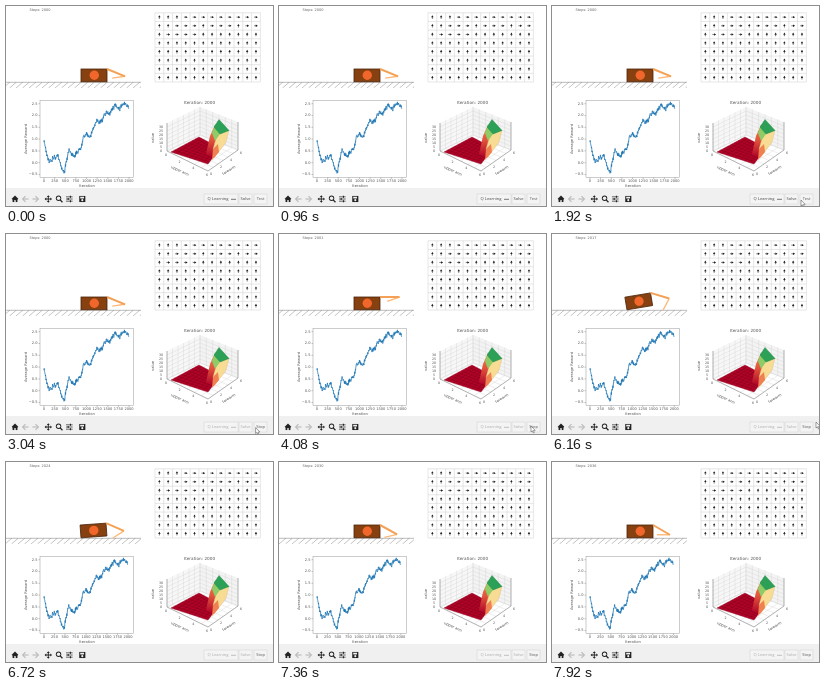
Recreate the animation shown at these times as an HTML page with a canvas. Size 267 px wide and 200 px high, loop 8 s.

```html
<!DOCTYPE html>
<html lang="en">
<head>
<meta charset="utf-8">
<title>Crawler learning</title>
<style>
html, body { margin: 0; width: 100%; height: 100%; overflow: hidden; background: #fff; }
canvas { display: block; width: 267px; height: 200px; }
</style>
</head>
<body>
<canvas id="stage"></canvas>
<script>
const canvas = document.getElementById('stage');
const c = canvas.getContext('2d');
const dpr = window.devicePixelRatio || 1;
canvas.width = 267 * dpr;
canvas.height = 200 * dpr;

const LOOP = 8000;
const RAD = Math.PI / 180;
const STEP_KEYS = [[3960, 2000], [4080, 2001], [5120, 2008], [6160, 2017], [6720, 2024], [7920, 2036]];
const REWARD = [136, 154, 150, 153, 165, 146, 147, 143, 128, 130, 119, 115, 108, 107, 100, 101, 101, 101]
  .map((y, i) => [38 + i * 5, y]);

const ramp = (v, from, to) => Math.max(0, Math.min(1, (v - from) / (to - from)));
const mix = (a, b, k) => a + (b - a) * k;
const between = (p, q, k) => [mix(p[0], q[0], k), mix(p[1], q[1], k)];

function sample(keys, at) {
  let i = 1;
  while (i < keys.length - 1 && keys[i][0] < at) i++;
  const [a, b] = [keys[i - 1], keys[i]];
  return mix(a[1], b[1], ramp(at, a[0], b[0]));
}

function path(points, stroke, width = 0.5, fill) {
  c.beginPath();
  points.forEach(([x, y]) => c.lineTo(x, y));
  if (fill) { c.closePath(); c.fillStyle = fill; c.fill(); }
  if (stroke) { c.strokeStyle = stroke; c.lineWidth = width; c.stroke(); }
}

function at(x, y, angle, scale, draw) {
  c.save();
  c.translate(x, y);
  c.rotate(angle * RAD);
  c.scale(scale, scale);
  draw();
  c.restore();
}

function text(str, x, y, size = 3.7, align = 'center', color = '#555', angle = 0, family = '"DejaVu Sans", sans-serif') {
  at(x, y, angle, 1, () => {
    c.font = `${size}px ${family}`;
    c.textAlign = align;
    c.textBaseline = 'middle';
    c.fillStyle = color;
    c.fillText(str, 0, 0);
  });
}

function disc(x, y, r, fill) {
  c.beginPath();
  c.arc(x, y, r, 0, 7);
  c.fillStyle = fill;
  c.fill();
}

// Gait: reach out with the arm raised, lower it, then pull the hand back.
function crawler(step) {
  const n = step - 2000;
  const reach = ramp(n, 1, 8), lower = ramp(n, 8, 12), pull = ramp(n, 12, 36);
  const armAngle = n ? 25 * lower + 5 * pull : 22;
  const handAngle = n ? 160 - 105 * reach + 5 * lower + 90 * Math.sqrt(pull) : 150;
  const bend = armAngle + handAngle;
  const shoulder = [26, -13];
  const elbow = [26 + 19.5 * Math.cos(armAngle * RAD), -13 + 19.5 * Math.sin(armAngle * RAD)];
  const hand = [elbow[0] + 13 * Math.cos(bend * RAD), elbow[1] + 13 * Math.sin(bend * RAD)];
  const tilt = -Math.max(0, Math.atan2(hand[1], hand[0])) / RAD;

  path([[0, 76.3], [135, 76.3]], '#777');
  c.save();
  c.beginPath();
  c.rect(0, 76, 135, 6);
  c.clip();
  for (let x = 4 - 22 * pull % 6.5; x < 145; x += 6.5) path([[x, 76], [x - 7, 82]], '#888', 0.5);
  c.restore();

  at(75, 76, tilt, 1, () => {
    c.fillStyle = '#87400f';
    c.fillRect(0, -13, 26, 12.8);
    c.strokeStyle = '#4a240c';
    c.lineWidth = 0.8;
    c.strokeRect(0, -13, 26, 12.8);
    disc(13.3, -6.7, 4.7, '#f0662b');
    path([elbow, hand], '#ffb878', 1.4);
    path([shoulder, elbow], '#f4a155', 2);
  });
}

function policyGrid() {
  const x0 = 149, y0 = 6.8, w = 8.78, h = 8.65, cols = 12, rows = 8;
  for (let i = 0; i <= cols; i++) path([[x0 + i * w, y0], [x0 + i * w, y0 + rows * h]], '#ccc', 0.5);
  for (let i = 0; i <= rows; i++) path([[x0, y0 + i * h], [x0 + cols * w, y0 + i * h]], '#ccc', 0.5);
  const pointsRight = (r, k) => r === 0 ? k > 2 : r === 1 ? k > 1 && k % 4 !== 1 : r === 2 && k > 0 && k < 5;
  for (let r = 0; r < rows; r++) for (let k = 0; k < cols; k++) {
    at(x0 + (k + 0.5) * w, y0 + (r + 0.5) * h, pointsRight(r, k) ? 0 : -90, 1, () => {
      path([[-1.8, 0], [1, 0]], '#222', 0.6);
      path([[-0.2, -1.2], [1.9, 0], [-0.2, 1.2]], null, 0, '#222');
    });
  }
}

function rewardPlot(step) {
  const toX = x => 38 + (x - 38) * 2000 / step;
  c.strokeStyle = '#999';
  c.lineWidth = 0.5;
  c.strokeRect(34, 94.3, 93.5, 77.2);
  for (let i = 0; i <= 8; i++) {
    const x = toX(38 + i * 10.63);
    path([[x, 171.5], [x, 173]], '#888');
    text(i * 250, x, 175.3, 3.6);
  }
  for (let i = 0; i < 7; i++) {
    const y = 97.7 + i * 11.8;
    path([[32.5, y], [34, y]], '#888');
    text((2.5 - i * 0.5).toFixed(1).replace('-', '−'), 31.5, y, 3.6, 'right');
  }
  text('Iteration', 81, 179.7);
  text('Average Reward', 20.5, 133, 3.7, 'center', '#555', -90);

  let seed = 7, drift = 0;
  const noise = () => (seed = seed * 16807 % 2147483647) / 2147483647 - 0.5;
  const line = [];
  for (let x = 38; x <= 123; x += 0.2) {
    drift = drift * 0.93 + noise() * 2.2;
    line.push([toX(x), sample(REWARD, x) + drift + noise() * 3]);
  }
  c.lineJoin = 'round';
  path(line, '#1f77b4', 0.8);
  c.lineJoin = 'miter';
}

function surfacePlot() {
  const L = [161, 145], F = [202, 165], R = [232, 144], B = [194, 129];
  const up = ([x, y]) => [x, y - 28];
  text('Iteration: 2000', 193.5, 97.2, 4.2);
  path([L, B, up(B), up(L)], null, 0, '#f7f7f7');
  path([B, R, up(R), up(B)], null, 0, '#f3f3f3');
  for (let i = 0; i <= 6; i++) {
    const k = i / 6, z = i * 4;
    path([L, B, R].map(([x, y]) => [x, y - z]), '#d5d5d5', 0.4);
    text(i * 5, 155, 145 - z, 3.3);
    for (const [p, q] of [[L, B], [B, R]]) {
      const foot = between(p, q, k);
      path([foot, up(foot)], '#d5d5d5', 0.4);
    }
    path([between(L, F, k), between(B, R, k)], '#d5d5d5', 0.4);
    path([between(L, B, k), between(F, R, k)], '#d5d5d5', 0.4);
    if (i % 2 === 0) {
      const a = between(L, F, k), b = between(F, R, k);
      text(i, a[0] - 1, a[1] + 4, 3.3);
      text(i, b[0] + 3, b[1] + 3.5, 3.3);
    }
  }
  path([up(L), L, F, R, up(R)], '#777');

  const floor = [[165, 146], [193, 131], [214, 142], [202, 158]];
  path(floor, '#8d001f', 0.4, '#b00426');
  for (let i = 1; i < 8; i++) {
    path([between(floor[0], floor[3], i / 8), between(floor[1], floor[2], i / 8)], '#7d001d', 0.4);
    path([between(floor[0], floor[1], i / 8), between(floor[3], floor[2], i / 8)], '#7d001d', 0.4);
  }
  const slope = c.createLinearGradient(0, 119, 0, 150);
  [[0, '#f08a50'], [0.5, '#e0523b'], [1, '#b3082a']].forEach(s => slope.addColorStop(...s));
  path([[204, 130], [209, 119], [213, 136], [208, 152], [200, 148]], null, 0, slope);
  path([[211, 129], [223, 124], [220, 136], [209, 151], [207, 143]], '#d9a866', 0.3, '#f8dc94');
  path([[207, 143], [212, 138], [213, 146], [206, 154]], null, 0, '#ee8051');
  path([[206, 127], [209, 119], [214, 128], [209, 135]], null, 0, '#8fcb67');
  path([[208, 121], [213, 113.5], [223, 124.5], [214, 128]], '#15803f', 0.4, '#2ba056');

  text('value', 147, 132, 3.7, 'center', '#555', -90);
  text('upper arm', 174, 165, 3.7, 'center', '#555', 25);
  text('forearm', 223, 164.5, 3.7, 'center', '#555', -32);
}

function icons() {
  const ink = '#222';
  const icon = (x, draw, angle = 0) => at(x, 193, angle, 0.87, draw);
  icon(9, () => {
    path([[-4, 0], [0, -4], [4, 0]], null, 0, ink);
    c.fillRect(-2.8, 0, 2, 3.5);
    c.fillRect(0.8, 0, 2, 3.5);
    c.fillRect(-2.8, 0, 5.6, 1.2);
  });
  for (const [x, angle] of [[19.5, 0], [29.5, 180]]) icon(x, () => {
    path([[-3, 0], [3.5, 0]], '#bbb', 1.3);
    path([[0, -3.3], [-3.3, 0], [0, 3.3]], '#bbb', 1.3);
  }, angle);
  for (let i = 0; i < 4; i++) icon(42.3, () => {
    path([[0, 0], [3, 0]], ink, 1.1);
    path([[2.3, -1.7], [4.3, 0], [2.3, 1.7]], null, 0, ink);
  }, i * 90);
  icon(53, () => {
    disc(-0.5, -0.8, 3.1, ink);
    disc(-0.5, -0.8, 2, '#f0f0f0');
    path([[1.3, 1], [4, 3.7]], ink, 1.5);
  });
  icon(63.3, () => [-2.5, 0, 2.5].forEach((y, i) => {
    const x = i % 2 ? -1.3 : 1.3;
    path([[-3.8, y], [3.8, y]], ink, 0.8);
    path([[x, y - 1.1], [x, y + 1.1]], ink, 1.2);
  }));
  icon(76.3, () => {
    c.fillStyle = ink;
    c.fillRect(-3.5, -3.5, 7, 7);
    c.fillStyle = '#f0f0f0';
    c.fillRect(-2.4, -2.6, 4.4, 2);
    disc(0, 1.3, 1.2, '#f0f0f0');
  });
}

function toolbar(t) {
  c.fillStyle = '#f0f0f0';
  c.fillRect(0, 182, 267, 18);
  icons();
  const busy = t >= 2320;
  const state = busy ? '#aaa' : '#444';
  const button = (label, x, w, textX, color) => {
    c.fillStyle = '#f4f4f4';
    c.fillRect(x, 188, w, 10);
    c.strokeStyle = '#d0d0d0';
    c.lineWidth = 0.5;
    c.strokeRect(x, 188, w, 10);
    text(label, textX, 193.2, 4.1, 'center', color, 0, '"Open Sans", sans-serif');
  };
  button('Q Learning', 198, 34, 212, state);
  path([[225, 193.3], [230, 193.3]], state, 0.7);
  button('Solve', 233, 13, 239.5, state);
  button(busy ? 'Stop' : 'Test', 248, 13, 254.6, '#555');
}

function cursor(t) {
  if (t < 1000 || t > 6400) return;
  const arrive = ramp(t, 1000, 1840), settle = ramp(t, 2960, 3360), leave = ramp(t, 6000, 6160);
  const x = 258 - 9 * arrive + 3 * settle + 12 * leave;
  const y = 170 + 24 * arrive - 2 * settle - 4 * leave;
  at(x, y, 0, 1, () =>
    path([[0, 0], [0, 6], [1.4, 4.8], [2.4, 7], [3.3, 6.5], [2.4, 4.5], [4.2, 4.4], [0, 0]], '#444', 0.5, '#fff'));
}

function frame(now) {
  const t = now % LOOP;
  const step = Math.floor(sample(STEP_KEYS, t) + 1e-6);
  c.setTransform(dpr, 0, 0, dpr, 0, 0);
  c.fillStyle = '#fff';
  c.fillRect(0, 0, 267, 200);
  text('Steps: ' + step, 23.5, 3.8, 3.5, 'left', '#666');
  crawler(step);
  policyGrid();
  rewardPlot(step);
  surfacePlot();
  toolbar(t);
  cursor(t);
  requestAnimationFrame(frame);
}
requestAnimationFrame(frame);
</script>
</body>
</html>
```
